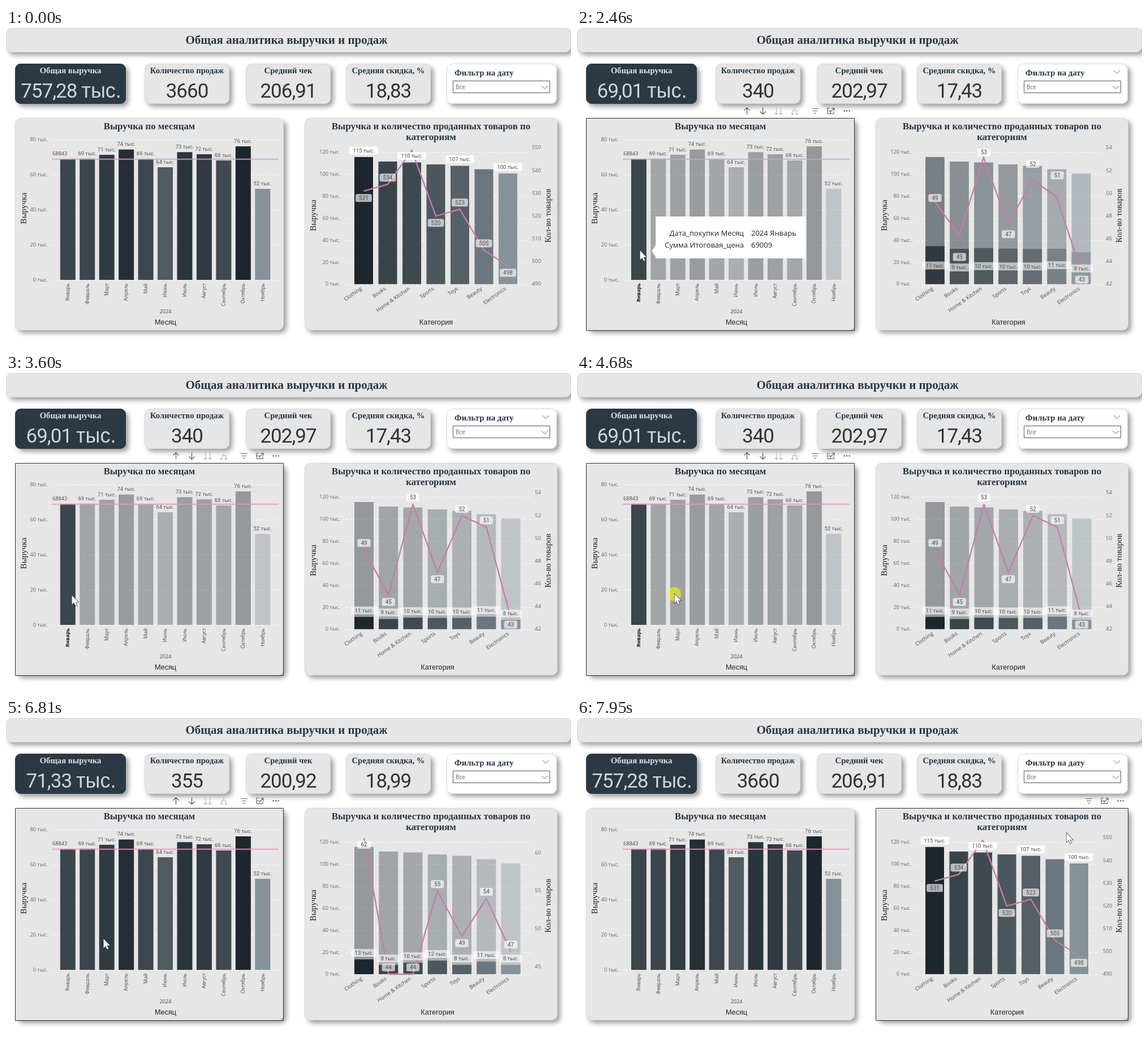
An HTML page with a canvas that plays this animation: 999 px wide and 560 px high, repeating every 8000 ms.

```html
<!DOCTYPE html>
<html lang="ru">
<head>
<meta charset="utf-8">
<style>
html, body { margin: 0; width: 100%; height: 100%; overflow: hidden; background: #fff; }
canvas { display: block; }
</style>
</head>
<body>
<canvas id="stage" width="999" height="560"></canvas>
<script>
const ctx = document.getElementById('stage').getContext('2d');
const LOOP = 8000, MORPH = 400;
const SERIF = '"Liberation Serif", serif', SANS = '"Liberation Sans", sans-serif';
const UI = '"Open Sans", sans-serif', DIN = 'Roboto, sans-serif';
const NAVY = '#263746', INK = '#252423', GRAY = '#666';

const months = ['Январь', 'Февраль', 'Март', 'Апрель', 'Май', 'Июнь', 'Июль', 'Август', 'Сентябрь', 'Октябрь', 'Ноябрь'];
const revenue = [69, 69.1, 71.3, 74.3, 68.9, 64.2, 72.8, 71.6, 68.1, 76.1, 51.9];
const categories = ['Clothing', 'Books', 'Home & Kitchen', 'Sports', 'Toys', 'Beauty', 'Electronics'];
const totals = [115.4, 111.3, 110.5, 108.7, 107.4, 104.3, 100.5];

// sides: whether each count label sits above (-), below (+) or is hidden (0)
const states = [
  { month: -1, kpi: ['757,28', '3660', '206,91', '18,83'], part: totals, count: [531, 534, 549, 520, 523, 505, 498],
    min: 490, max: 550, from: 490, step: 10, sides: '+-0+--+', barLabels: '1010101', x0: 632.5, gap: 42.5, w: 33, dim: 1, lit: 0, plotEnd: 923 },
  { month: 0, kpi: ['69,01', '340', '202,97', '17,43'], part: [11.1, 9.2, 10.4, 10.2, 10.2, 11.3, 8.4], count: [49, 45, 53, 47, 52, 51, 43],
    min: 42, max: 54, from: 42, step: 2, sides: '-+-+--+', tip: ['2024 Январь', '69009'] },
  { month: 2, kpi: ['71,33', '355', '200,92', '18,99'], part: [13.4, 8.4, 10.3, 12.3, 8.4, 11.4, 8.4], count: [62, 44, 44, 55, 49, 54, 47],
    min: 44, max: 62, from: 45, step: 5, sides: '+---+--', tip: ['2024 Март', '71325'] }
];
for (const s of states.slice(1))
  Object.assign(s, { barLabels: '1111111', x0: 633, gap: 43.25, w: 34, dim: 0.4, lit: 1, plotEnd: 928 });

// ghost: opacity at which the tooltip lingers
const clicks = [
  { at: 2120, delay: 94, from: states[0], to: states[1], ghost: 0 },
  { at: 4750, delay: 94, from: states[1], to: states[2], ghost: 0.1 },
  { at: 6810, delay: 42, from: states[2], to: states[0], ghost: 0 }
];
const pointerPath = [
  [840, 285, 532], [980, 226, 461], [1240, 226, 461], [1720, 111, 393], [3540, 111, 393], [4280, 172, 390],
  [7380, 172, 390], [7620, 861, 205], [7940, 861, 205], [7950, 865, 203], [LOOP, 865, 203]
];

const mix = (a, b, p) => a + (b - a) * p;
const clamp = v => Math.max(0, Math.min(1, v));
const ease = t => t < 0.5 ? 4 * t ** 3 : 1 - 4 * (1 - t) ** 3;
const shade = p => `rgb(${mix(134, 28, p)},${mix(146, 38, p)},${mix(154, 44, p)})`;
const barY = v => 452.5 - v * 1.946;
const countY = (s, i) => 452.5 - (s.count[i] - s.min) / (s.max - s.min) * 240.5;

function text(str, x, y, font, color, align = 'center', angle = 0, baseline = 'middle') {
  ctx.save();
  ctx.translate(x, y);
  ctx.rotate(angle * Math.PI / 180);
  ctx.font = font;
  ctx.fillStyle = color;
  ctx.textAlign = align;
  ctx.textBaseline = baseline;
  ctx.fillText(str, 0, 0);
  ctx.restore();
}
function heading(str, x, y, size, color = NAVY, align = 'center') {
  text(str, x, y, `bold ${size}px ${SERIF}`, color, align, 0, 'alphabetic');
}
function card(x, y, w, h, fill = '#e6e6e6', border = '#d9d9d9') {
  ctx.save();
  ctx.shadowColor = 'rgba(0,0,0,.38)';
  ctx.shadowBlur = 9;
  ctx.shadowOffsetX = ctx.shadowOffsetY = 5;
  ctx.fillStyle = fill;
  ctx.beginPath();
  ctx.roundRect(x, y, w, h, 10);
  ctx.fill();
  ctx.restore();
  stroke(border, 1, () => ctx.roundRect(x + .5, y + .5, w - 1, h - 1, 10));
}
function stroke(color, width, trace, dash = []) {
  ctx.strokeStyle = color;
  ctx.lineWidth = width;
  ctx.setLineDash(dash);
  ctx.beginPath();
  trace();
  ctx.stroke();
  ctx.setLineDash([]);
}
function lines(...paths) {
  for (const p of paths)
    for (let i = 0; i < p.length; i += 2) ctx[i ? 'lineTo' : 'moveTo'](p[i], p[i + 1]);
}
function grid(x1, x2, y) {
  stroke('rgba(255,255,255,.85)', 1, () => lines([x1, y, x2, y]), [5, 4]);
}
function bar(cx, w, top, bottom, color, alpha) {
  ctx.globalAlpha = alpha;
  ctx.fillStyle = color;
  ctx.fillRect(cx - w / 2, top, w, bottom - top);
  ctx.globalAlpha = 1;
}
function tag(str, x, y, size, pad, alpha) {
  ctx.font = `${size}px ${DIN}`;
  const w = ctx.measureText(str).width + pad;
  ctx.fillStyle = `rgba(255,255,255,${alpha})`;
  ctx.beginPath();
  ctx.roundRect(x - w / 2, y - 7, w, 14, 3);
  ctx.fill();
  text(str, x, y + .5, `${size}px ${DIN}`, '#505050');
}
function chevron(x, y) {
  stroke(GRAY, 1, () => lines([x - 5.5, y - 2.5, x, y + 3, x + 5.5, y - 2.5]));
}

function drawKpi(state) {
  const boxes = [['Общая выручка', 16, 196], ['Количество продаж', 245, 150], ['Средний чек', 424, 150], ['Средняя скидка, %', 601, 150]];
  boxes.forEach(([label, x, w], i) => {
    const cx = x + w / 2, value = state.kpi[i];
    if (i) card(x, 63, w, 71);
    else card(x, 63, w, 71, '#2b3944', '#2b3944');
    heading(label, cx, 80, 14.7, i ? NAVY : '#dbe1e6');
    ctx.letterSpacing = '-1px';
    const digits = `35px ${DIN}`;
    if (i) text(value, cx, 123, digits, '#323232', 'center', 0, 'alphabetic');
    else {
      ctx.font = digits;
      const numberW = ctx.measureText(value).width + 8;
      ctx.letterSpacing = '0px';
      const unit = `36px ${SANS}`;
      ctx.font = unit;
      const left = cx - (numberW + ctx.measureText('тыс.').width) / 2 + 1;
      text('тыс.', left + numberW, 123, unit, '#cbd7e0', 'left', 0, 'alphabetic');
      ctx.letterSpacing = '-1px';
      text(value, left, 123, digits, '#cbd7e0', 'left', 0, 'alphabetic');
    }
    ctx.letterSpacing = '0px';
  });
}

function drawFilter(open) {
  card(779, 63, 195, 71, '#fff');
  heading('Фильтр на дату', 793, 84, 14.8, NAVY, 'left');
  stroke('#555', 1, () => ctx.rect(790.5, 93.5, 171, 21));
  text('Все', 795, 105, `10px ${UI}`, GRAY, 'left');
  chevron(952.5, 104.5);
  if (open) chevron(954.5, 77.5);
}

function drawMonths(selected) {
  card(16, 159, 475, 375);
  heading('Выручка по месяцам', 253.5, 179, 16.9);
  for (let v = 0; v <= 80; v += 20) {
    const y = 445 - v * 3.1;
    grid(82, 482, y + .5);
    text(v + ' тыс.', 74, y + .5, `9.3px ${UI}`, GRAY, 'right');
  }
  revenue.forEach((v, i) => {
    const x = 109.3 + i * 34.45, top = 445 - v * 3.1, on = i === selected;
    bar(x, 27, top, 445, shade((v - 51.9) / 24.2), selected < 0 || on ? 1 : .4);
    text(months[i], x + .5, 451, `${on ? 'bold ' : ''}8.7px ${UI}`, on ? '#111' : '#484848', 'right', -90);
  });
  stroke('rgba(232,150,196,.85)', 2, () => lines([81, 231.7, 482, 231.7]));
  revenue.forEach((v, i) => {
    if (i) text(Math.round(v) + ' тыс.', 109.3 + i * 34.45, 436 - v * 3.1, `9.5px ${DIN}`, '#555');
  });
  text('68843', 82, 223, `9.2px ${UI}`, '#444', 'left');
  text('Выручка', 36, 318.5, `14.8px ${SERIF}`, INK, 'center', -90, 'alphabetic');
  text('2024', 282, 502, `9.2px ${UI}`, '#484848');
  text('Месяц', 282, 523.5, `12.7px ${SANS}`, INK, 'center', 0, 'alphabetic');
}

function drawCategories(a, b, p) {
  card(528, 159, 447, 375);
  heading('Выручка и количество проданных товаров по', 751.5, 179, 16.9);
  heading('категориям', 751.5, 198, 16.9);
  for (let v = 0; v <= 120; v += 20) {
    grid(600, b.plotEnd, Math.round(barY(v)) + .5);
    text(v + ' тыс.', 591, barY(v) + .5, `9.3px ${UI}`, GRAY, 'right');
  }
  for (let v = b.from; v <= b.max; v += b.step)
    text(v, 946, 452.5 - (v - b.min) / (b.max - b.min) * 240.5, `9.3px ${UI}`, GRAY, 'right');

  const w = mix(a.w, b.w, p);
  const centre = i => mix(a.x0 + a.gap * i, b.x0 + b.gap * i, p);
  totals.forEach((v, i) => {
    const color = shade((v - 100.5) / 14.9);
    bar(centre(i), w, barY(v), 452.5, color, mix(a.dim, b.dim, p));
    bar(centre(i), w, barY(mix(a.part[i], b.part[i], p)), 452.5, color, mix(a.lit, b.lit, p));
  });
  ctx.lineJoin = 'round';
  stroke('#c67da6', 2.3, () => lines(totals.flatMap((_, i) => [centre(i), mix(countY(a, i), countY(b, i), p)])));
  ctx.lineJoin = 'miter';

  categories.forEach((name, i) => {
    const x = b.x0 + b.gap * i, side = b.sides[i];
    text(name, x - 4, 460, `9.3px ${UI}`, '#484848', 'right', -35);
    if (b.barLabels[i] === '1') tag(Math.floor(b.part[i]) + ' тыс.', x, barY(b.part[i]) - 11.5, 9.7, 12, b.lit ? .6 : .85);
    if (side !== '0') tag(b.count[i], x, countY(b, i) + (side === '+' ? 12 : -12), 10, 12, .66);
  });
  text('Выручка', 548, 331, `14.8px ${SERIF}`, INK, 'center', -90, 'alphabetic');
  text('Кол-во товаров', 962.5, 331.5, `14.8px ${SERIF}`, INK, 'center', -90, 'alphabetic');
  text('Категория', (598 + b.plotEnd) / 2, 523.5, `12.7px ${SANS}`, INK, 'center', 0, 'alphabetic');
}

function drawToolbar(x) {
  const y = 146.5;
  stroke(GRAY, 1.2, () => {
    lines([x - 62, y - 4, x - 50, y - 4], [x - 60, y, x - 52, y], [x - 58, y + 4, x - 54, y + 4]);
    lines([x - 30, y - 5, x - 34, y - 5, x - 34, y + 5, x - 23, y + 5, x - 23, y + 1],
      [x - 27, y - 5, x - 22, y - 5, x - 22, y], [x - 22, y - 5, x - 28, y + 1],
      [x - 34, y, x - 29, y, x - 29, y + 5]);
  });
  ctx.fillStyle = '#555';
  for (const d of [-4.5, 0, 4.5]) ctx.fillRect(x + d - 1, y - 1.2, 2.2, 2.2);
}
function drawSortIcons() {
  const arrow = (x, dir) => lines([x, 146.5 - 6 * dir, x, 146.5 + 6 * dir], [x - 5, 146.5 + dir, x, 146.5 + 6 * dir, x + 5, 146.5 + dir]);
  stroke('#555', 1.2, () => { arrow(300.5, -1); arrow(328.5, 1); });
  stroke('#b4b4b4', 1.1, () => {
    for (const x of [352.5, 360.5]) lines([x, 140, x, 153], [x - 3, 150, x, 153, x + 3, 150]);
    lines([385, 140, 385, 146, 381, 146, 381, 153], [385, 146, 389, 146, 389, 153],
      [379, 151, 381, 153, 383, 151], [387, 151, 389, 153, 391, 151]);
  });
}

function drawTooltip(x, y, rows, alpha) {
  const left = x + 28, top = y - 60, font = `13px ${UI}`;
  ctx.save();
  ctx.globalAlpha = alpha;
  ctx.font = font;
  ctx.fillStyle = '#fff';
  ctx.beginPath();
  ctx.rect(left, top, 185 + ctx.measureText(rows[0]).width, 74);
  lines([left, y - 9, left - 7, y + 1, left, y + 11]);
  ctx.fill();
  ['Дата_покупки Месяц', 'Сумма Итоговая_цена'].forEach((label, i) => {
    const base = top + 34 + 21 * i;
    text(label, left + 156, base, font, INK, 'right', 0, 'alphabetic');
    text(rows[i], left + 169, base, font, INK, 'left', 0, 'alphabetic');
  });
  ctx.restore();
}

function pointerAt(t) {
  const i = pointerPath.findIndex(k => k[0] > t);
  if (i < 1) return null;
  const [t0, x0, y0] = pointerPath[i - 1], [t1, x1, y1] = pointerPath[i];
  const p = (t - t0) / (t1 - t0);
  return { x: mix(x0, x1, p), y: mix(y0, y1, p) };
}
function drawPointer({ x, y }, pressed) {
  if (pressed) {
    ctx.fillStyle = 'rgba(255,255,0,.55)';
    ctx.beginPath();
    ctx.arc(x - .5, y + .5, 12.5, 0, 7);
    ctx.fill();
  }
  ctx.save();
  ctx.translate(x, y);
  const trace = () => {
    lines([.5, 0, .5, 16.5, 4.3, 13, 6.8, 18.8, 9.3, 17.7, 6.8, 12, 11.8, 12]);
    ctx.closePath();
  };
  stroke('#1a1a1a', 1.2, trace);
  ctx.fillStyle = '#fff';
  ctx.fill();
  ctx.restore();
}

function draw(t) {
  const click = clicks.findLast(c => t >= c.at);
  const since = click ? t - click.at : 0;
  let from = states[0], to = states[0], p = 1;
  if (click) {
    const started = since >= click.delay;
    from = click.from;
    to = started ? click.to : click.from;
    p = started ? ease(clamp((since - click.delay) / MORPH)) : 1;
  }
  const pointer = pointerAt(t);

  ctx.fillStyle = '#fff';
  ctx.fillRect(0, 0, 999, 560);
  card(0, 0, 999, 43);
  heading('Общая аналитика выручки и продаж', 496, 27.5, 21);
  drawKpi(to);
  drawFilter(!!click);
  drawMonths(click ? click.to.month : -1);
  drawCategories(from, to, p);

  if (pointer && pointer.x < 491) {
    stroke('#333', 1, () => ctx.rect(16.5, 159.5, 474, 375));
    drawSortIcons();
    drawToolbar(477);
  } else if (pointer && pointer.x > 528) {
    stroke('#333', 1, () => ctx.rect(528.5, 159.5, 446, 375));
    drawToolbar(961);
  }
  if (click && click.to.tip) {
    const fadeIn = clamp((since - 130) / 130), fadeOut = clamp((605 - since) / 155);
    const alpha = Math.min(fadeIn, Math.max(fadeOut, click.ghost));
    if (alpha > 0) drawTooltip(pointer.x, pointer.y, click.to.tip, alpha);
  }
  if (pointer) drawPointer(pointer, clicks.some(c => t >= c.at - 200 && t < c.at));
}

const start = performance.now();
function frame() {
  draw((performance.now() - start) % LOOP);
  requestAnimationFrame(frame);
}
frame();
</script>
</body>
</html>
```
